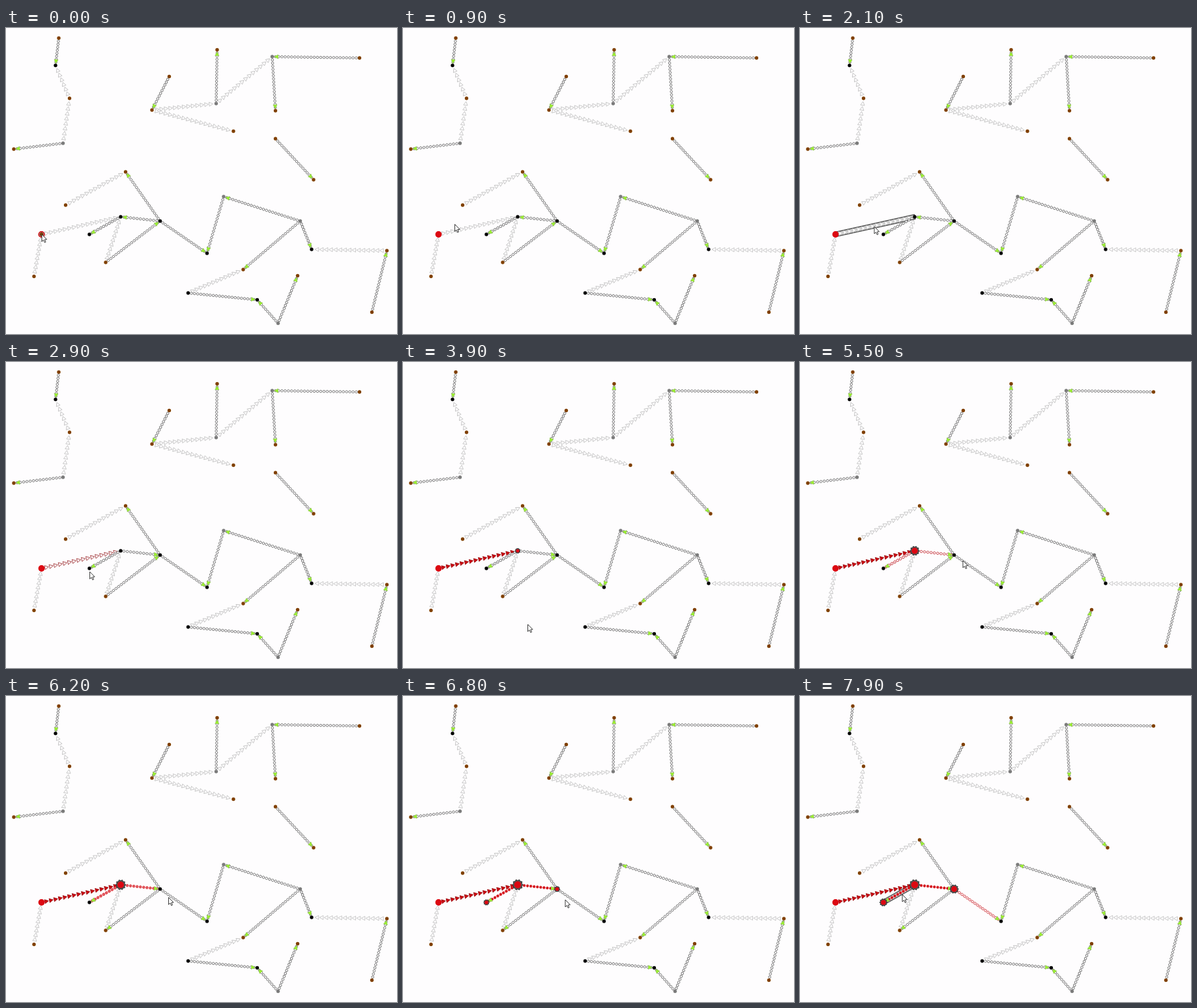
An HTML page with a canvas that plays this animation: 600 by 470 pixels, repeating every 8 s.

```html
<!DOCTYPE html>
<html lang="en">
<head>
<meta charset="utf-8">
<title>Signal network</title>
<style>
html, body { margin: 0; width: 100%; height: 100%; overflow: hidden; background: #fefdfe; }
canvas { display: block; }
</style>
</head>
<body>
<canvas id="stage" width="600" height="470"></canvas>
<script>
const ctx = document.getElementById('stage').getContext('2d');
const LOOP = 8000, STEP = 100;
const BROWN = '#804000', GRAY = '#7c7c7c', BLACK = '#000', RED = '#dc0812';

const nodes = {
  a: [81, 15.5, BROWN], b: [76, 57.5, BLACK], c: [97.5, 108, BROWN], d: [87.5, 177, GRAY],
  e: [12, 186, BROWN], f: [250.5, 74.5, BROWN], g: [224, 126, BROWN], h: [349, 158.5, BROWN],
  i: [322.5, 116, GRAY], j: [324, 33.5, BROWN], k: [408.5, 44, GRAY], l: [542.5, 46, BROWN],
  m: [413.5, 127, BROWN], n: [413.5, 170, BROWN], o: [472, 233, BROWN], p: [183.5, 221, BROWN],
  q: [91.5, 272, BROWN], r: [236.5, 296.5, BLACK], s: [176, 290, BLACK], t: [128, 317, BLACK],
  u: [54.5, 317, BROWN], v: [43, 381.5, BROWN], w: [153, 360, BROWN], x: [308.5, 346, BLACK],
  y: [334, 259, GRAY], z: [451.5, 296.5, GRAY], A: [469, 340, BLACK], B: [584.5, 342, BROWN],
  C: [561.5, 436.5, BROWN], D: [364, 371, BROWN], E: [279.5, 407, BLACK], F: [385.5, 417.5, BLACK],
  G: [417.5, 453.5, GRAY], H: [447.5, 380.5, BROWN]
};

const beads = 'ab de fg ij lk km no rp rs st wr rx yx zy zA zD EF GF GH CB'.split(' ');
const chevrons = 'cb dc gi gh ik qp us vu ws ED BA'.split(' ');
const flips = { rs: 2700, wr: 6200 };

// Each active link: outline starts, outline done, fill done
const active = {
  us: [2500, 3000, 3700], rs: [4700, 5700, 6500],
  st: [4700, 5700, 6500], rx: [7200, 8000, 8700]
};
// Time and outer radius of each growing node
const growth = {
  s: [[3600, 3], [3900, 4], [5500, 7.4], [6800, 8.4]],
  r: [[6500, 3], [6800, 4.4], [7900, 6.9]],
  t: [[6500, 3], [6800, 4.4], [7900, 6]]
};
const hovers = [['us', 1500, 2700], ['st', 7700, 8000]];
const pointer = [
  [0, 55, 317], [200, 55, 317], [900, 79.5, 301.5], [1400, 100, 303], [2100, 114, 305],
  [2700, 116, 306], [3900, 191.5, 403], [4500, 197, 400], [5500, 250, 305],
  [6800, 249, 313], [7200, 240, 312], [7900, 157, 305]
];

const clamp = v => Math.max(0, Math.min(1, v));
const ramp = (t, from, to) => clamp((t - from) / (to - from));
const mix = (from, to, k) => `rgb(${from.map((v, i) => Math.round(v + (to[i] - v) * k))})`;

function sample(table, t) {
  let i = 0;
  while (i < table.length - 2 && t > table[i + 1][0]) i++;
  const [p, q] = [table[i], table[i + 1]], k = ramp(t, p[0], q[0]);
  return p.slice(1).map((v, n) => v + (q[n + 1] - v) * k);
}

function disc(x, y, r, fill, stroke, width = 1) {
  ctx.beginPath();
  ctx.arc(x, y, r, 0, Math.PI * 2);
  if (fill) { ctx.fillStyle = fill; ctx.fill(); }
  if (stroke) { ctx.strokeStyle = stroke; ctx.lineWidth = width; ctx.stroke(); }
}

function polygon(points, fill, stroke, width = 1) {
  ctx.beginPath();
  points.forEach(([x, y]) => ctx.lineTo(x, y));
  ctx.closePath();
  ctx.fillStyle = fill;
  ctx.fill();
  ctx.strokeStyle = stroke;
  ctx.lineWidth = width;
  ctx.stroke();
}

// Runs draw(length) with the x axis laid along the link
function along(from, to, draw) {
  const [x, y] = nodes[from], [x2, y2] = nodes[to];
  ctx.save();
  ctx.translate(x, y);
  ctx.rotate(Math.atan2(y2 - y, x2 - x));
  draw(Math.hypot(x2 - x, y2 - y));
  ctx.restore();
}

function link(id, t, isBead) {
  const [start, lit, full] = active[id] || [9e4, 9.1e4, 9.2e4];
  const outline = ramp(t, start, lit), fill = ramp(t, lit, full);
  const stroke = mix(isBead ? [112, 112, 112] : [190, 190, 190], isBead ? [222, 50, 58] : [150, 12, 16], outline);
  const inside = mix([254, 253, 254], [208, 8, 16], fill);
  const flipped = t >= flips[id];
  const [from, to] = flipped ? [id[1], id[0]] : id;
  along(from, to, length => {
    const margin = isBead ? 5 : 8;
    const count = Math.round((length - 2 * margin) / (isBead ? 4.9 : 7.2));
    const gap = (length - 2 * margin) / count;
    for (let n = 0; n <= count; n++) {
      const x = margin + n * gap;
      if (isBead) disc(x, 0, 1.8, inside, stroke, 0.9);
      else polygon([[x - 2.7, -3.1], [x + 3, 0], [x - 2.7, 3.1]], inside, stroke, 0.8);
    }
    if (isBead) polygon([[length - 9, -3], [length - 3.2, 0], [length - 9, 3]], '#9cf52a', '#94c858', 0.8);
  });
}

function hoverBox(id) {
  along(id[0], id[1], length => {
    ctx.fillStyle = '#d6d6d6';
    ctx.fillRect(0, -3.5, length, 7);
    ctx.strokeStyle = '#555';
    ctx.lineWidth = 1.5;
    ctx.strokeRect(0, -3.5, length, 7);
  });
}

function gear(x, y, radius) {
  const points = Array.from({ length: 20 }, (_, n) => {
    const r = n % 2 ? radius * 0.78 : radius, angle = n * Math.PI / 10;
    return [x + r * Math.cos(angle), y + r * Math.sin(angle)];
  });
  polygon(points, '#555', '#222', 0.8);
  disc(x, y, radius * 0.64, RED);
}

function drawNode(id, t) {
  const [x, y, color] = nodes[id];
  if (id === 'u') {
    if (t >= 400) disc(x, y, 4.9, RED);
    else {
      disc(x, y, 4.2, '#fff', '#cc1016', 1.8);
      disc(x, y, 2.7, BROWN, '#301000', 0.6);
    }
  } else if (growth[id] && t >= growth[id][0][0]) gear(x, y, sample(growth[id], t)[0]);
  else disc(x, y, 2.7, color);
}

function drawPointer(t) {
  const [x, y] = sample(pointer, t);
  const shape = [[0, 0], [0, 11], [2.5, 8.7], [4.3, 12.5], [6, 11.7], [4.3, 8], [7.6, 7.8]];
  polygon(shape.map(([dx, dy]) => [x + dx, y + dy]), '#fff', '#222', 0.9);
}

function render(t) {
  ctx.fillStyle = '#fefdfe';
  ctx.fillRect(0, 0, 600, 470);
  hovers.forEach(([id, from, to]) => { if (t >= from && t < to) hoverBox(id); });
  chevrons.forEach(id => link(id, t, false));
  beads.forEach(id => link(id, t, true));
  Object.keys(nodes).forEach(id => drawNode(id, t));
  drawPointer(t);
}

const began = performance.now();
function tick() {
  const t = (performance.now() - began) % LOOP;
  render(Math.floor(t / STEP) * STEP);
  requestAnimationFrame(tick);
}
tick();
</script>
</body>
</html>
```
